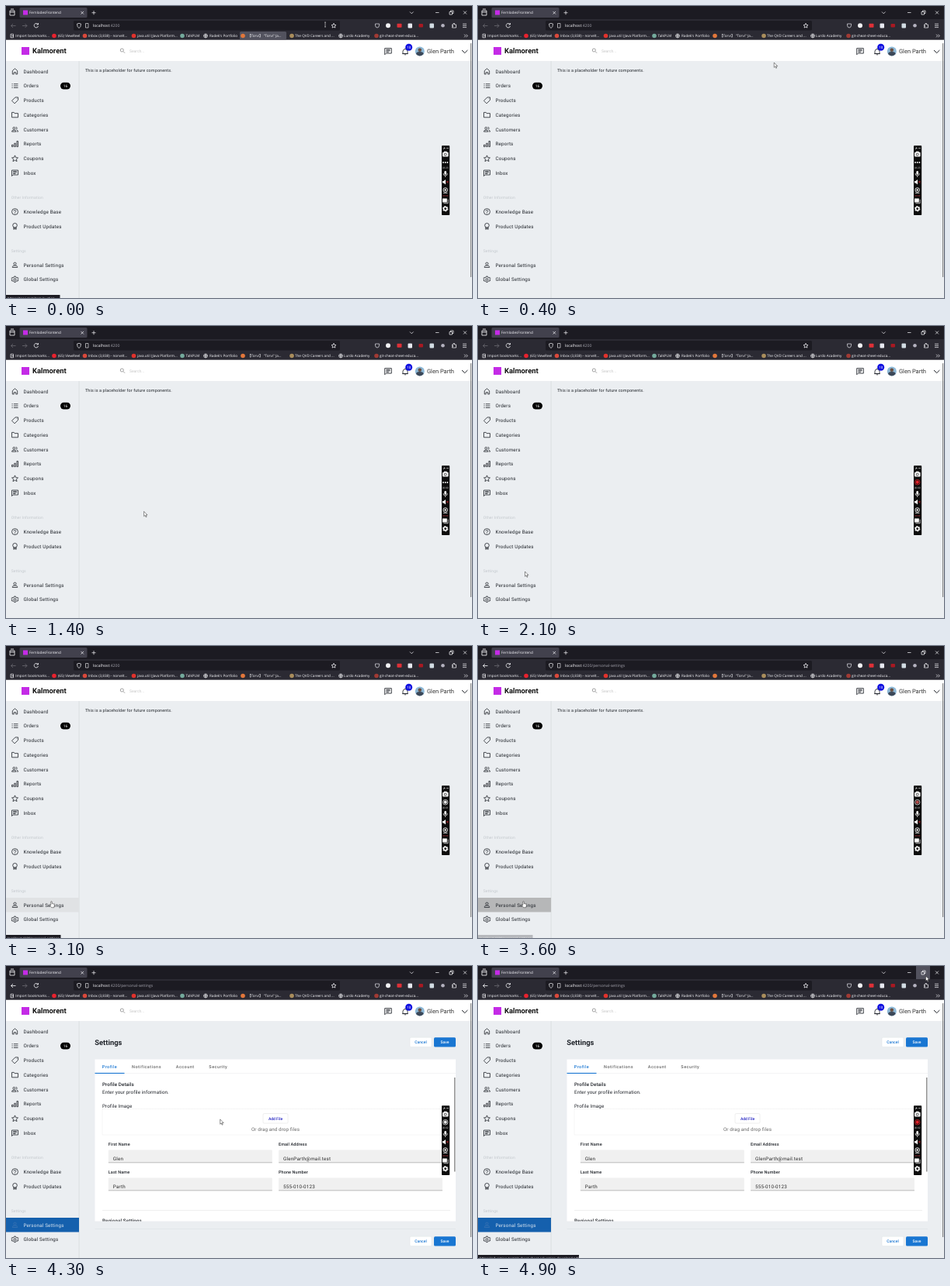
Animation of 600 by 377 pixels, one loop 5 s. Source, as an HTML page:

```html
<!DOCTYPE html>
<html lang="en">
<head>
<meta charset="utf-8">
<title>Settings demo</title>
<style>
html, body { margin: 0; width: 100%; height: 100%; overflow: hidden; background: #ebeef1; }
svg { display: block; width: 600px; height: 377px; }
text { font-family: Roboto, sans-serif; text-rendering: geometricPrecision; white-space: pre; }
.ui { font-family: "Open Sans", "Noto Sans CJK JP", sans-serif; }
</style>
</head>
<body>
<svg id="stage" viewBox="0 0 600 377"></svg>
<script>
const LOOP = 5000, STEP = 100;
const BLUE = '#1976d2', INK = '#20242a', PALE = '#fbfbfe';

// Shape helpers; y of a text is the middle of its capitals
const rect = (x, y, w, h, fill, extra = '') =>
  `<rect x="${x}" y="${y}" width="${w}" height="${h}" fill="${fill}" ${extra}/>`;
const dot = (x, y, r, fill, extra = '') => `<circle cx="${x}" cy="${y}" r="${r}" fill="${fill}" ${extra}/>`;
const line = (d, color, w = .8, extra = '') =>
  `<path d="${d}" fill="none" stroke="${color}" stroke-width="${w}" ${extra}/>`;
const text = (x, y, s, size, fill = INK, extra = '') =>
  `<text x="${x}" y="${y + size * .36}" font-size="${size}" fill="${fill}" ${extra}>${s}</text>`;
const ui = (x, y, s, size = 4.6, fill = PALE) => text(x, y, s, size, fill, 'class="ui"');
const body = (x, y, s, extra = '') => text(x, y, s, 6.25, INK, 'letter-spacing=".1" ' + extra);
const mid = 'text-anchor="middle"';

// Icons in a 24 unit box
const ring = (x, y, r) => `M${x - r} ${y}a${r} ${r} 0 1 0 ${2 * r} 0a${r} ${r} 0 1 0 ${-2 * r} 0`;
const ICONS = {
  home: 'M4 10v11h5v-6h6v6h5V10L12 3z',
  list: 'M8 6h14M8 12h14M8 18h14M2 6h3M2 12h3M2 18h3',
  tag: 'M2 13L13 2h9v9L11 22zM17 6.500v1',
  folder: 'M2 4h7l2 3h11v13H2z',
  group: ring(9, 8, 3.5) + 'M2 19q0-5 7-5t7 5zM15 4.5a3.5 3.5 0 0 1 0 7M18 14q4 1 4 5h-3',
  bars: 'M2 21v-6h4v6zM10 21V10h4v11zM18 21V3h4v18z',
  star: 'M12 2l3 7 7 .6-5.3 4.7 1.6 7L12 17.6 5.7 21.3l1.6-7L2 9.6 9 9z',
  chat: 'M2 22V3h20v15H6zM6 7h12M6 10.500h12M6 14h8',
  help: ring(12, 12, 10) + 'M9 10a3 3 0 1 1 4 2.600q-1 .5-1 2.400M12 17v2',
  award: ring(12, 9, 7) + 'M8 15v7l4-2 4 2v-7M10 16v4M14 16v4',
  person: ring(12, 8, 4) + 'M4 20v-2q0-4 8-4t8 4v2z',
  gear: ring(12, 12, 3.5) + 'M10 2h4l1 3 3 1.500 3-1 2 3.500-2 2v1l2 2-2 3.500-3-1-3 1.500-1 3h-4l-1-3-3-1.500-3 1-2-3.500 2-2v-1l-2-2 2-3.500 3 1L9 5z',
  bell: 'M5 18V11q0-6 7-7 7 1 7 7v7zM3 18h18M10 21h4M12 2v2',
  search: ring(10, 10, 6) + 'M15 15l6 6'
};
const icon = (name, x, y, color = INK, k = .4, w = 2) =>
  `<g transform="translate(${x - 12 * k} ${y - 12 * k}) scale(${k})">${line(ICONS[name], color, w)}</g>`;

const MENU = [
  ['home', 'Dashboard', 84.4], ['list', 'Orders', 103.1], ['tag', 'Products', 121.9],
  ['folder', 'Categories', 140.6], ['group', 'Customers', 159.4], ['bars', 'Reports', 178.1],
  ['star', 'Coupons', 196.9], ['chat', 'Inbox', 215.6], ['help', 'Knowledge Base', 265.6],
  ['award', 'Product Updates', 284.4], ['person', 'Personal Settings', 334.3], ['gear', 'Global Settings', 353]
];
// Bookmark: icon x, icon colour, text x, label
const MARKS = [
  [62, '#e8222e', 67, '(65) ViewReel'], [101.5, '#d9483b', 106, 'Inbox (3,838) - norvelt...'],
  [164.5, '#e0322c', 169, 'java.util (Java Platform...'], [227, '#74aa9c', 231.5, 'TalkPLM'],
  [257, 0, 262, "Radek's Portfolio"], [305, '#e2773b', 311, '【Torvi】 "Torvi" Ja...'],
  [368, '#a98d5c', 372, 'The QVD Careers and ...'], [431, 0, 435, 'Lurdo Academy'],
  [477, '#a03a34', 481, 'git-cheat-sheet-educa...']
];

function chrome(t) {
  const moved = t >= 3500;
  let s = rect(0, 0, 600, 17, '#1c1b22') + rect(0, 17, 600, 26.7, '#2b2a33')
    + rect(17.5, 2, 87, 13, '#42414d', 'rx="1.5"') + rect(22, 5.5, 6, 6, '#c42be6')
    + ui(30, 8.5, 'FernlodesFrontend')
    + line('M5 6h6v6h-6zM6 4h4M5 8h6', PALE, .8)
    + line('M96.5 7l3.500 3.500m0-3.500l-3.500 3.500M110.500 8.700h5M113 6.200v5', PALE, .7);
  if (t >= 4800) s += rect(564, 0, 18, 17, '#52525e');
  s += line('M520 7.500l2.300 2.300 2.300-2.300M553 8.500h4.500M571 7.500h3.500v3.500h-3.500zM572.500 7.500v-1.500h3.500v3.500h-1.500M589 6.500l4 4m0-4l-4 4', PALE, .7);
  // Toolbar
  s += line('M12.500 25.500H6.500m2.500-2.500l-2.500 2.500 2.500 2.500', moved ? PALE : '#6b6a72', .8)
    + line('M21 25.500h6m-2.500-2.500l2.500 2.500-2.500 2.500', '#6b6a72', .8)
    + line('M41 23.500a2.700 2.700 0 1 0 .5 2.500M41.500 22v2h-2', PALE, .8)
    + rect(87, 19, 343, 12.5, '#1c1b22', 'rx="1.5"')
    + line('M94 22.300l2.500.8q0 4-2.500 5.500-2.500-1.500-2.500-5.500z', PALE, .7)
    + line('M102.500 22.500h3.500v5.500h-3.500z', PALE, .6)
    + `<text class="ui" x="112" y="27.3" font-size="5.1" fill="#fbfbfe">localhost<tspan fill="#a2a1aa">:4200${moved ? '/personal-settings' : ''}</tspan></text>`
    + icon('star', 422, 25.3, PALE, .3, 2.4)
    + line('M475.500 23h5v2q-.3 3-2.500 3t-2.500-3z', '#d0d0d6', .8)
    + dot(492, 25.3, 3, '#f2f2f4') + rect(503.5, 22.8, 6, 5, '#df3037', 'rx=".8"')
    + rect(517.5, 22.5, 5.5, 6, '#e8eaf2', 'rx="1"') + rect(531.5, 23, 5.5, 4.5, '#a81922', 'rx="1"')
    + rect(545.5, 22.5, 5.5, 6, '#d2dce3', 'rx="1"') + dot(562.5, 25.3, 2.3, '#b4b2bf')
    + line('M574.500 24h1.500v-1.500h1.500V24h2v4h-5v-1.500h1v-1h-1z', PALE, .7)
    + line('M588 23.200h5M588 25.400h5M588 27.600h5', PALE, .7);
  // Bookmarks
  if (t < 200) s += rect(301, 33, 60, 10.5, '#52525e', 'rx="1.5"');
  s += line('M6 36.300h3.500v4.500H6zM7 38.500h3', PALE, .7) + ui(12.3, 38.5, 'Import bookmarks...');
  for (const [x, color, tx, label] of MARKS) {
    s += color ? dot(x, 38.5, 2.8, color)
      : line(ring(x, 38.5, 2.5) + `M${x - 2.5} 38.500h5M${x} 36q-2 2.500 0 5q2-2.500 0-5`, PALE, .6);
    s += ui(tx, 38.5, label);
  }
  return s + line('M590 36.700l1.800 1.800-1.800 1.800M592.500 36.700l1.800 1.800-1.800 1.800', PALE, .7);
}

function header() {
  return rect(0, 43.7, 600, 27.3, '#fff') + rect(20, 53, 10, 10, '#c42be6')
    + text(34, 58, 'Kalmorent', 9.375, '#111', 'font-weight="700"')
    + icon('search', 150, 57.7, '#777', .34) + text(159, 58, 'Search...', 5, '#c6c6c6')
    + icon('chat', 492, 58.5, INK, .43) + icon('bell', 514, 59, INK, .43)
    + dot(518.7, 53.3, 4.5, '#1010e0') + text(518.7, 53.4, '10', 4.5, '#fff', mid)
    + dot(532.8, 58.5, 6, '#8db9d8') + dot(532.8, 56.7, 2.3, '#6b5143')
    + `<path d="M528 62q0-3 4.800-3t4.800 3a6 6 0 0 1-9.600 0z" fill="#3c4858"/>`
    + text(542, 58.3, 'Glen Parth', 7.5, '#333')
    + line('M587 57l3.700 3.700 3.700-3.700', INK, 1);
}

function sidebar(t) {
  const active = t >= 3700;
  const fill = active ? (t < 4100 ? '#14549c' : '#1560ad') : t >= 3500 ? '#b6b7b8' : t >= 2700 ? '#e0e2e4' : 'none';
  let s = rect(93.7, 71, .7, 306, '#d3d7da') + rect(0, 325, 94, 18.5, fill);
  for (const [name, label, y] of MENU) {
    const on = active && name === 'person';
    s += icon(name, 11.5, y, on ? '#3b74b4' : INK)
      + text(22.4, y, label, 6.25, on ? '#d9e4f0' : INK, 'letter-spacing=".195"');
  }
  return s + rect(70, 98.8, 13, 8.6, '#000', 'rx="4.3"') + text(76.5, 103.2, '16', 4.8, '#fff', mid)
    + text(6.7, 247.6, 'Other Information', 5, '#c3c8cd', 'letter-spacing=".1"')
    + text(6.7, 316.3, 'Settings', 5, '#c3c8cd', 'letter-spacing=".1"');
}

function buttons(y) {
  const bold = mid + ' font-weight="500"';
  return rect(520, y, 28, 12.4, '#fff', 'rx="1.5" stroke="#dfe2e5" stroke-width=".5"')
    + text(534, y + 6.3, 'Cancel', 5, BLUE, bold)
    + rect(551, y, 28, 12.4, BLUE, 'rx="1.5"') + text(565, y + 6.3, 'Save', 5, '#fff', bold);
}

function field(x, y, label, value) {
  return text(x, y, label, 5.47, INK, 'font-weight="500" letter-spacing=".1"')
    + rect(x, y + 7.3, 211, 16.5, '#f0f0f0', 'rx="1"') + rect(x, y + 23.3, 211, .6, '#949494')
    + text(x + 6, y + 18, value, 6.25, '#2a2a2a', 'letter-spacing=".195"');
}

function settings(t) {
  const bold = 'font-weight="500"';
  let s = text(114.3, 98.6, 'Settings', 9.375, INK, 'font-weight="700"') + buttons(92.2) + buttons(349.2)
    + rect(114.5, 120.5, 464.5, 209, '#fff') + rect(114.5, 138.4, 464.5, .5, '#e6e8ea')
    + rect(114.5, 137.9, 38, 1.1, BLUE);
  if (t >= 3800) [['Profile', 133.5], ['Notifications', 181], ['Account', 230.7], ['Security', 273.3]].forEach(
    ([label, x], i) => s += text(x, 129.7, label, 5.47, i ? '#666' : BLUE, `${mid} ${bold} letter-spacing=".488"`));
  return s + body(124, 152.5, 'Profile Details', bold) + body(124, 163.2, 'Enter your profile information.')
    + body(124, 180.6, 'Profile Image')
    + rect(124, 184.5, 448, 33.5, 'none', 'stroke="#d8d8d8" stroke-width=".5" stroke-dasharray="1 1"')
    + rect(331, 190.5, 32, 12.5, '#fff', 'rx="1.5" stroke="#dcdcdc" stroke-width=".5"')
    + text(347, 197, 'Add File', 5, '#2020c0', mid + ' ' + bold)
    + text(347, 210.9, 'Or drag and drop files', 6.25, '#666', mid + ' letter-spacing=".1"')
    + field(131.8, 230.3, 'First Name', 'Glen') + field(351, 230.3, 'Email Address', 'GlenParth@mail.test')
    + field(131.8, 266.3, 'Last Name', 'Parth') + field(351, 266.3, 'Phone Number', '555-010-0123')
    + rect(124, 315.5, 448, .5, '#dedede')
    + body(124, 329, 'Regional Settings', bold + ' clip-path="url(#card)"')
    + rect(577.2, 144, 1.2, 121.5, '#777') + rect(114.5, 339, 464.5, .5, '#d8dce0');
}

function recorder(t) {
  const W = '#fff', BLACK = '#0c0c0c', RED = '#e5232b', x = 565.7;
  let s = rect(561, 180.3, 10.2, 89.7, BLACK, 'rx=".8"')
    + line('M563 185l2-2m-1.500 0h1.500v1.500M567 183.700h3', W, .6)
    + rect(562, 188.8, 7.6, 5.6, W, 'rx="1"') + rect(564, 187.7, 3.6, 2, W)
    + dot(x, 191.6, 1.5, 'none', `stroke="${BLACK}" stroke-width=".7"`);
  if (t < 1500) s += [-2.7, 0, 2.7].map(d => dot(x + d, 202, .9, W)).join('');
  else {
    // The lamp pulses every 1.4 s
    const phase = (t + 1000) % 1400;
    const color = phase < 400 ? RED : phase < 500 ? '#b8504e' : '#e8e8e8';
    s += dot(x, 201.7, 3.3, 'none', `stroke="${phase < 400 ? RED : '#e8e8e8'}" stroke-width=".8"`) + dot(x, 201.7, 2.1, color);
  }
  const time = t < 700 ? '03:23' : '00:0' + Math.max(0, Math.floor((t - 2100) / 1000));
  return s + text(x, 208.7, time, 3.2, '#ccc', mid)
    + rect(564.4, 213, 2.6, 4.8, W, 'rx="1.3"') + line('M563 216q0 3 2.700 3t2.700-3M565.700 219v2', W, .7)
    + `<path d="M562 226h1.500l2.500-2v6.500l-2.500-2H562z" fill="#fff"/>` + line('M567.200 226l2.500 2.500m0-2.500l-2.500 2.500', RED, .7)
    + dot(x, 237.5, 2.8, 'none', 'stroke="#fff" stroke-width=".9"') + dot(x, 237.5, 1.2, W)
    + line('M563 241.500h5.400', W, .7) + text(x, 244.5, '00:00', 2.9, '#b8323a', mid)
    + rect(562, 248.5, 5.8, 5, W) + line('M563.500 254.700h5.700v-5', W, .7)
    + dot(x, 261.8, 2.2, 'none', 'stroke="#fff" stroke-width="1.5"')
    + dot(x, 261.8, 3.3, 'none', 'stroke="#fff" stroke-width="1" stroke-dasharray="1.728"');
}

function status(t) {
  const show = (w, s, o = 1) => `<g opacity="${o}">${rect(0, 373, w, 5, '#1c1b22')}${ui(2, 377.3, s, 4.4)}</g>`;
  if (t < 300) return show(69.5, 'https://torvi.test/item/auction');
  if (t >= 2800 && t < 3700) return show(70.5, 'localhost:4200/personal-settings', t < 3600 ? 1 : .25);
  if (t >= 4700) return show(130, 'https://education.test/git-cheat-sheet-education-download.pdf');
  return '';
}

const PATH = [[0, 411, 24], [300, 390, 62], [800, 346, 117], [1300, 205, 222], [1800, 68, 309], [2100, 60.5, 317],
  [2400, 60.5, 317], [2700, 58.5, 329.5], [3900, 58.5, 329.5], [4400, 330, 165], [4700, 505, 42], [4900, 576.5, 13]];
function pointer(t) {
  const i = PATH.findIndex(p => p[0] > t);
  const b = PATH.at(i), a = i < 0 ? b : PATH[i - 1];
  const k = i < 0 ? 0 : (t - a[0]) / (b[0] - a[0]);
  const x = a[1] + (b[1] - a[1]) * k, y = a[2] + (b[2] - a[2]) * k;
  let shape = `<path d="M0 0v6.300l1.500-1.300 1 2.300 1-.4-1-2.300h2z" fill="#fff" stroke="#222" stroke-width=".5"/>`;
  if (t < 100) shape = line('M-1-3h2M0-3v6M-1 3h2', '#ddd', .6);
  else if (t >= 2700 && t <= 3900)
    shape = `<path d="M-.7.500q.7-1 1.400 0v2.500l2.600.7q.8.300.6 1.500l-.6 3h-3.200l-2.300-3q0-.9 1.500-.2z" fill="#fff" stroke="#222" stroke-width=".5"/>`;
  return `<g transform="translate(${x} ${y})">${shape}</g>`;
}

const stage = document.getElementById('stage');
const clip = '<clipPath id="card"><rect x="114" y="120" width="465" height="209.5"/></clipPath>';
function draw(t) {
  stage.innerHTML = clip + rect(0, 0, 600, 377, '#ebeef1') + sidebar(t) + header() + chrome(t)
    + (t >= 3700 ? settings(t)
      : text(102, 83.5, 'This is a placeholder for future components.', 5.47, INK, 'letter-spacing=".098"'))
    + rect(598, 48, 1.2, 302, '#858585', 'rx=".6"') + recorder(t) + status(t) + pointer(t);
}

let last = -1;
function tick() {
  const t = Math.floor(performance.now() % LOOP / STEP) * STEP;
  if (t !== last) draw(last = t);
  requestAnimationFrame(tick);
}
tick();
</script>
</body>
</html>
```
